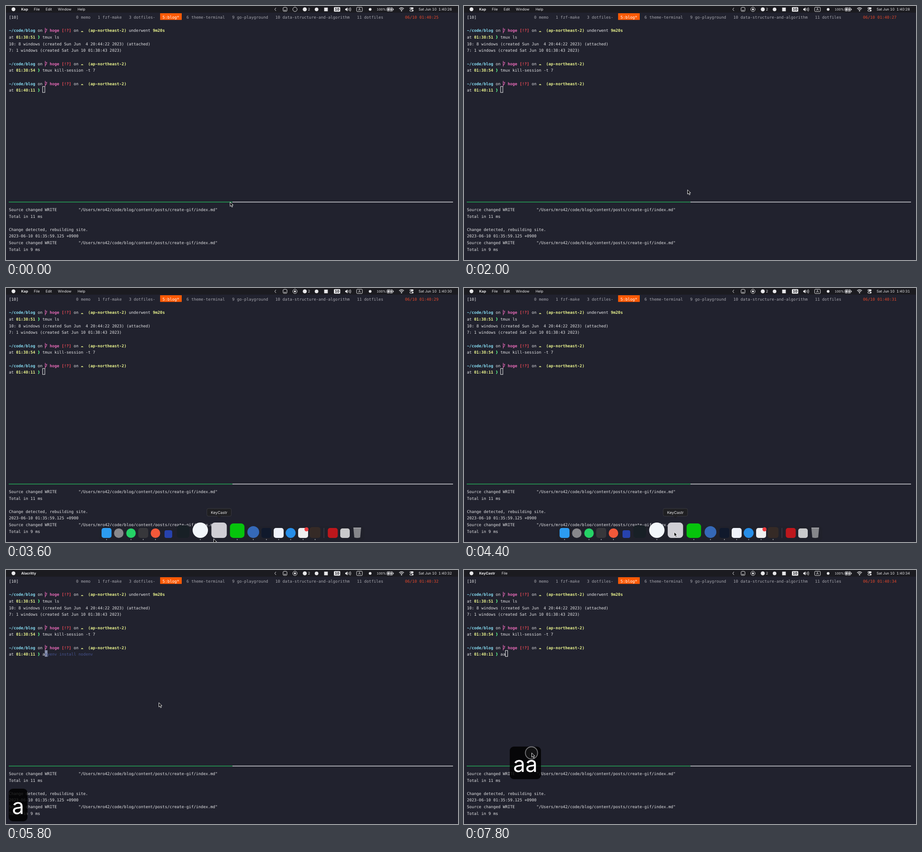
An HTML page that plays this animation: 998 px wide and 561 px high, repeating every 8000 ms.

```html
<!DOCTYPE html>
<html lang="en">
<head>
<meta charset="utf-8">
<title>Terminal session</title>
<style>
html, body { margin: 0; width: 100%; height: 100%; overflow: hidden; background: #21222e; }
svg { display: block; }
text { white-space: pre; text-rendering: geometricPrecision; }
.mono { font: 8.8px "DejaVu Sans Mono", monospace; fill: #e4e4e6; }
.b { font-weight: 700; }
.cyan { fill: #86dcf2; }
.pink { fill: #e569b6; }
.red { fill: #ee4a55; }
.yellow { fill: #eaf48e; }
.grey { fill: #a6a6ad; }
.orange { fill: #e2472c; }
.white { fill: #fff; }
.hint { fill: #46538f; }
.ui { font: 7.8px Inter, sans-serif; fill: #ececee; font-variant-numeric: tabular-nums; }
.ui.b { font-weight: 700; }
.thin { fill: none; stroke: #e8e8ea; stroke-width: 1; }
.key { font: 48px Inter, sans-serif; fill: #fff; text-anchor: middle; }
</style>
</head>
<body>
<svg id="stage" width="998" height="561" viewBox="0 0 998 561"></svg>
<script>
const LOOP = 8000, STEP = 200;
const COL = 5.3, ROW = 14.65;
const colX = c => 6.4 + c * COL;
const rowY = r => 28 + r * ROW;
const stage = document.getElementById('stage');

// Text on the terminal grid; parts are [text, classes].
const row = (r, parts, col = 0, id = '') =>
  `<text class="mono" id="${id}" x="${colX(col)}" y="${rowY(r)}">` +
  parts.map(([s, c = '']) => `<tspan class="${c}">${s}</tspan>`).join('') + '</text>';
const ui = (x, s, cls = '', id = '') => `<text class="ui ${cls}" id="${id}" x="${x}" y="10">${s}</text>`;
const path = (d, attrs = 'class="thin"') => `<path d="${d}" ${attrs}/>`;
const rect = (x, y, w, h, r, attrs) => `<rect x="${x}" y="${y}" width="${w}" height="${h}" rx="${r}" ${attrs}/>`;
const circle = (x, y, r, attrs) => `<circle cx="${x}" cy="${y}" r="${r}" ${attrs}/>`;

function prompt(r, time, command = '', tail = []) {
  const y = rowY(r), y2 = rowY(r + 1);
  return row(r, [['~/code/blog', 'cyan b'], [' on   '], ['hoge', 'pink b'], [' '], ['[!?]', 'red b'],
      [' on    '], ['(ap-northeast-2)', 'yellow b'], ...tail]) +
    path(`M86.6 ${y - 9}v12M86.8 ${y}q3.6-2 2.8-6M87.6 ${y - 6}h3.2`, 'fill="none" stroke="#e569b6" stroke-width="1.1"') +
    path(`M165.5 ${y}q0-1.6 1.5-1.6q1-1.6 2 0q1.8 0 1.8 1.6z`, 'class="yellow"') +
    row(r + 1, [['at '], [time, 'yellow b'], ['   ' + command]]) +
    path(`M71.3 ${y2 - 6.8}q3.4 3.6 0 7.4`, 'fill="none" stroke="#58e887" stroke-width="1.6"');
}

const windows = [[28, '0 memo'], [37, '1 fzf-make'], [50, '3 dotfiles-'], [74, '6 theme-terminal'],
  [93, '9 go-playground'], [111, '10 data-structure-and-algorithm'], [145, '11 dotfiles']];
const write = [['Source changed WRITE         "/Users/mro42/code/blog/content/posts/create-gif/index.md"']];

const terminal = row(0, [['[10]']]) +
  windows.map(([c, s]) => row(0, [[s, 'grey']], c)).join('') +
  rect(340.3, 16, 47.7, 14.7, 0, 'fill="#ff5a05"') + row(0, [['5:blog*', 'white']], 64) +
  `<text class="mono orange" id="date" x="${colX(165)}" y="${rowY(0)}"></text>` +
  prompt(2, '01:38:51', 'tmux ls', [[' underwent '], ['9m20s', 'yellow b']]) +
  row(4, [['10: 8 windows (created Sun Jun  4 20:44:22 2023) (attached)']]) +
  row(5, [['7: 1 windows (created Sat Jun 10 01:38:43 2023)']]) +
  prompt(7, '01:38:54', 'tmux kill-session -t 7') +
  prompt(10, '01:40:11') +
  rect(0, 177.8, 5, 13.2, 0, 'id="caret"') +
  row(11, [], 14, 'typed') +
  path('M6 433H500', 'stroke="#27a657" stroke-width="1.3"') +
  path('M500 433H987', 'stroke="#d4d4d8" stroke-width="1.3"') +
  row(29, write) + row(30, [['Total in 11 ms']]) + row(32, [['Change detected, rebuilding site.']]) +
  row(33, [['2023-06-10 01:35:59.125 +0900']]) + row(34, write) + row(35, [['Total in 9 ms']]);

const light = 'fill="#e8e8ea"';
const menuBar = rect(0, 0, 998, 14.6, 0, 'fill="#1b1b20"') +
  circle(16.5, 7.2, 4.2, light) + ui(33.5, '', 'b', 'app') + '<g id="menus"></g>' +
  path('M596 4l-2.6 3.4l2.6 3.4') +
  rect(611.8, 3, 8.6, 8.8, 2, 'class="thin"') + path('M613.5 9.5h5') +
  circle(638, 7.4, 4.8, 'class="thin"') + circle(638, 7.4, 2.2, `id="rec" ${light}`) +
  circle(659.7, 7.4, 4.4, light) + ui(666.5, '2') +
  circle(685.7, 7.4, 4, light) + rect(702.5, 3.6, 8, 8, 0, light) +
  rect(724, 2.6, 14, 9.8, 1.5, light) +
  '<text class="ui b" x="731" y="10.3" text-anchor="middle" style="fill:#1b1b20">10</text>' +
  path('M749 5.8h2l3-2.6v8.6l-3-2.6h-2z', light) + path('M755.8 5.5q1.5 2 0 4M757.8 4.2q2.6 3.3 0 6.6M759.8 3q3.4 4.4 0 9') +
  rect(774.2, 2.8, 12.6, 9.4, 1.5, 'class="thin"') + '<text class="ui" x="780.5" y="10.2" text-anchor="middle">A</text>' +
  circle(804, 7.4, 3, light) +
  '<text class="ui" x="818.5" y="10" style="font-size:7px">100%</text>' +
  rect(841, 3.8, 13, 7.4, 2, 'class="thin"') + rect(842.5, 5.2, 10, 4.6, 1, light) +
  path('M849 3l-3.5 5h2.4l-1 4l3.8-5.2h-2.4z', `${light} stroke="#1b1b20" stroke-width=".7"`) + path('M855.6 6v3') +
  path('M868 6q5.3-4.6 10.6 0M870 8.1q3.3-2.8 6.6 0', 'class="thin" style="stroke-width:1.5"') + circle(873.3, 10.4, 1.3, light) +
  rect(891.2, 3, 8.6, 4, 2, light) + circle(893.3, 5, 1.1, 'fill="#1b1b20"') +
  rect(891.6, 8.3, 7.8, 3.4, 1.7, 'class="thin"') + circle(897.6, 10, 1.3, light) +
  ui(911, '', '', 'clock');

// x, size, colour, round, running, how far it follows the pointer
const icons = [
  [222, 22, '#2c9cf0', 0, 1], [249, 21, '#88888b', 1, 0], [276, 21, '#25d366', 1, 1], [303, 22, '#37373b', 0, 1],
  [330, 21, '#f2593a', 1, 1], [358.5, 17, '#2742ad', 0, 0], [391, 28, '#182026', 0, 0, .85], [429, 34, '#f2f6fa', 1, 1, .9],
  [470.5, 34, '#cfced4', 0, 0, 1.05], [510.5, 32, '#06c40c', 0, 1, .85], [546, 26, '#3569b8', 1, 1, .5],
  [575, 22, '#10192c', 0, 1], [602, 22, '#eff2fa', 0, 1], [628.5, 22, '#278ee8', 1, 1], [656, 22, '#efeff0', 0, 1],
  [682.5, 24, '#352a26', 0, 1], [721.5, 22, '#bd171c', 0, 0], [748.5, 21, '#c9c9cb', 0, 0]];
const dock = rect(205, 526, 586, 33, 8, 'fill="#20212c" fill-opacity=".95"') +
  icons.map(([x, size, color, round, running]) => '<g class="icon">' +
    rect(x - size / 2, 552 - size, size, size, size * (round ? .5 : .23), `fill="${color}"`) +
    (running ? circle(x, 555.6, 1, 'fill="#b8b8bc"') : '') + '</g>').join('') +
  circle(663.5, 533, 4.5, 'fill="#ed3b3f"') + path('M702 530v22', 'stroke="#4a4b55"') +
  path('M767 530h17l-2 21q-6.5 2-13 0z', 'fill="#85868a"') + path('M767 530h17', 'stroke="#b5b5b8" stroke-width="1.5"') +
  '<g id="tip">' + rect(443.5, 487, 54, 17, 3.5, 'fill="#1f1f22" stroke="#414147" stroke-width=".8"') +
  path('M466 504l4.5 4l4.5-4z', 'fill="#1f1f22"') +
  '<text class="ui" x="470.5" y="498.6" text-anchor="middle" style="font-size:8.5px">KeyCastr</text></g>';

stage.innerHTML = rect(0, 0, 998, 561, 0, 'fill="#21222e"') + terminal + menuBar +
  `<g id="dock">${dock}</g>` +
  `<g id="overlay">${rect(0, 0, 69, 72, 9, 'id="plate" fill="#000" fill-opacity=".82"')}<text class="key" id="keys" y="56"></text></g>` +
  circle(0, 0, 13.5, 'id="ring" fill="#222" fill-opacity=".45" stroke="#77777a" stroke-width="1.8"') +
  path('M0 0v9.5l2.2-2l1.7 3.7l1.8-.8l-1.7-3.6h3z', 'id="pointer" fill="#08080a" stroke="#fff" stroke-width=".9"');

const el = Object.fromEntries([...stage.querySelectorAll('[id]')].map(e => [e.id, e]));
const iconEls = [...stage.querySelectorAll('.icon')];

const pointerPath = [[0, 494.8, 433], [200, 495, 432], [1200, 493.5, 406], [2200, 493.5, 406], [2600, 484, 520],
  [2800, 468, 556], [3600, 458.5, 554], [4400, 464, 539], [4800, 430, 440], [5200, 350, 303], [5400, 337.5, 293],
  [6200, 337.5, 293], [7000, 190, 363], [7400, 54.5, 497], [7800, 149.5, 404]];
const dockSlide = [[2600, 42], [3000, 0], [4400, 0], [4800, 42]];
const statusSeconds = [[0, 25], [200, 27], [2200, 29], [4200, 31], [5200, 32], [7200, 34]];
const apps = [[0, 'Kap', [[61.5, 'File'], [87.5, 'Edit'], [114.5, 'Window'], [158, 'Help']]],
  [5200, 'Alacritty', []], [7400, 'KeyCastr', [[83, 'File']]]];
const typing = [[0, '', ''], [5600, 'a', 'nyenv install nodenv'], [6000, 'aa', '']];

const current = (table, t) => table.findLast(s => s[0] <= t);
function tween(table, t) {
  const i = table.findIndex(s => s[0] > t);
  if (i < 1) return (i ? table.at(-1) : table[0]).slice(1);
  const [a, b] = [table[i - 1], table[i]], k = (t - a[0]) / (b[0] - a[0]);
  return a.slice(1).map((v, n) => v + (b[n + 1] - v) * k);
}
const move = (e, x, y) => e.setAttribute('transform', `translate(${x} ${y})`);
const show = (e, on) => e.setAttribute('display', on ? 'block' : 'none');

function draw(t) {
  const [px, py] = tween(pointerPath, t);
  move(el.pointer, px, py);

  el.clock.textContent = `Sat Jun 10  1:40:${26 + Math.floor((t + 800) / 1000)}`;
  el.date.textContent = `06/10 01:40:${current(statusSeconds, t)[1]}`;
  show(el.rec, t >= 400);
  const [, app, menus] = current(apps, t);
  el.app.textContent = app;
  el.menus.innerHTML = menus.map(([x, s]) => ui(x, s)).join('');

  const [, typed, hint] = current(typing, t);
  const caretColor = hint ? '#8991ad' : '#f0f0f0';
  el.typed.innerHTML = `${typed}<tspan class="hint">${hint}</tspan>`;
  el.caret.setAttribute('x', colX(14 + typed.length) + .2);
  el.caret.setAttribute('fill', app === 'Alacritty' ? caretColor : 'none');
  el.caret.setAttribute('stroke', caretColor);

  const [slide] = tween(dockSlide, t);
  show(el.dock, slide < 42);
  move(el.dock, 0, slide);
  const shift = Math.max(-5, Math.min(5, (458.5 - px) * .65));
  icons.forEach((icon, i) => move(iconEls[i], shift * (icon[5] || 0), 0));
  show(el.tip, slide === 0);
  move(el.tip, shift * 1.05, 0);

  const dragging = t >= 7400, width = 14 + 27.5 * typed.length;
  show(el.overlay, typed);
  el.plate.setAttribute('width', width);
  el.keys.textContent = typed;
  el.keys.setAttribute('x', width / 2);
  move(el.overlay, 6 + (dragging ? px - 54.5 : 0), 483 + (dragging ? py - 497 : 0));
  show(el.ring, dragging);
  move(el.ring, px - .5, py);
}

function tick() {
  const t = performance.now() % LOOP;
  draw(Math.floor(t / STEP) * STEP);
  requestAnimationFrame(tick);
}
tick();
</script>
</body>
</html>
```
